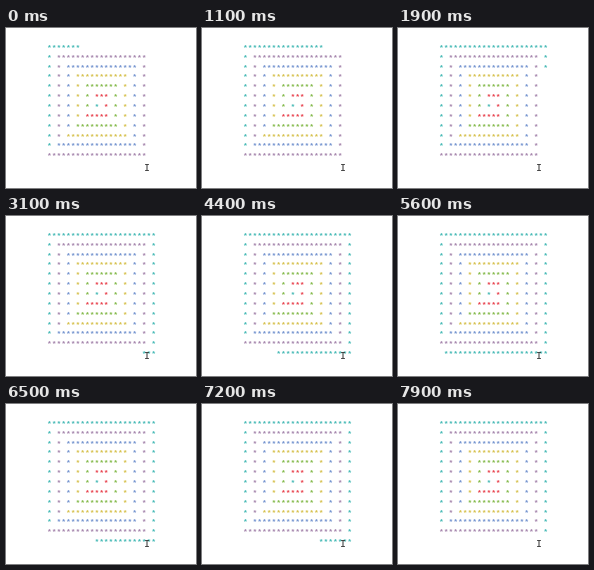
These frames come from a looping animation (190x160 px, 8 s). An HTML page with a canvas:

```html
<!DOCTYPE html>
<html>
<head>
<meta charset="utf-8">
<style>
html, body { margin: 0; width: 100%; height: 100%; overflow: hidden; background: #fff; }
canvas { display: block; }
</style>
</head>
<body>
<canvas id="stage" width="190" height="160"></canvas>
<script>
const ctx = document.getElementById('stage').getContext('2d');
const COLORS = ['#e8414d', '#83b94a', '#d6c04c', '#7393cf', '#a585ac', '#45b9b5'];
const LOOP = 8000, STEP = 100;
const CELL = { x: 4.73, y: 9.86 }, ORIGIN = { x: 43.5, y: 18 };

// Square spiral growing outwards: up, right, down, left; sideways runs hold two stars per unit.
function buildSpiral() {
  const directions = [[0, -1], [1, 0], [0, 1], [-1, 0]];
  let col = 10, row = 6;
  const stars = [{ col, row, color: COLORS[5] }];
  for (let run = 0; run < 24; run++) {
    const [dx, dy] = directions[run % 4];
    const length = (Math.floor(run / 2) + 1) * (dx ? 2 : 1);
    for (let i = 0; i < length; i++) {
      col += dx;
      row += dy;
      stars.push({ col, row, color: COLORS[Math.floor(run / 4)] });
    }
  }
  return stars;
}

const spiral = buildSpiral();

// The spiral completes at tick 53, then unwinds; ticks 4 and 71 are pauses.
function hiddenStars(tick) {
  if (tick < 4) return 52 - tick;
  if (tick <= 53) return 53 - tick;
  return tick - (tick < 71 ? 53 : 54);
}

function drawCursor() {
  ctx.fillStyle = '#333';
  ctx.fillRect(139, 136, 4, 0.8);
  ctx.fillRect(140.5, 136, 1, 7);
  ctx.fillRect(139, 142.2, 4, 0.8);
}

function draw(time) {
  const tick = Math.floor((time % LOOP) / STEP);
  ctx.fillStyle = '#fff';
  ctx.fillRect(0, 0, 190, 160);
  ctx.font = 'bold 8px "Liberation Mono", monospace';
  ctx.textAlign = 'center';
  for (const { col, row, color } of spiral.slice(0, spiral.length - hiddenStars(tick))) {
    ctx.fillStyle = color;
    ctx.fillText('*', ORIGIN.x + col * CELL.x, ORIGIN.y + row * CELL.y + 3.8);
  }
  drawCursor();
}

const start = performance.now();
function frame() {
  draw(performance.now() - start);
  requestAnimationFrame(frame);
}
frame();
</script>
</body>
</html>
```
